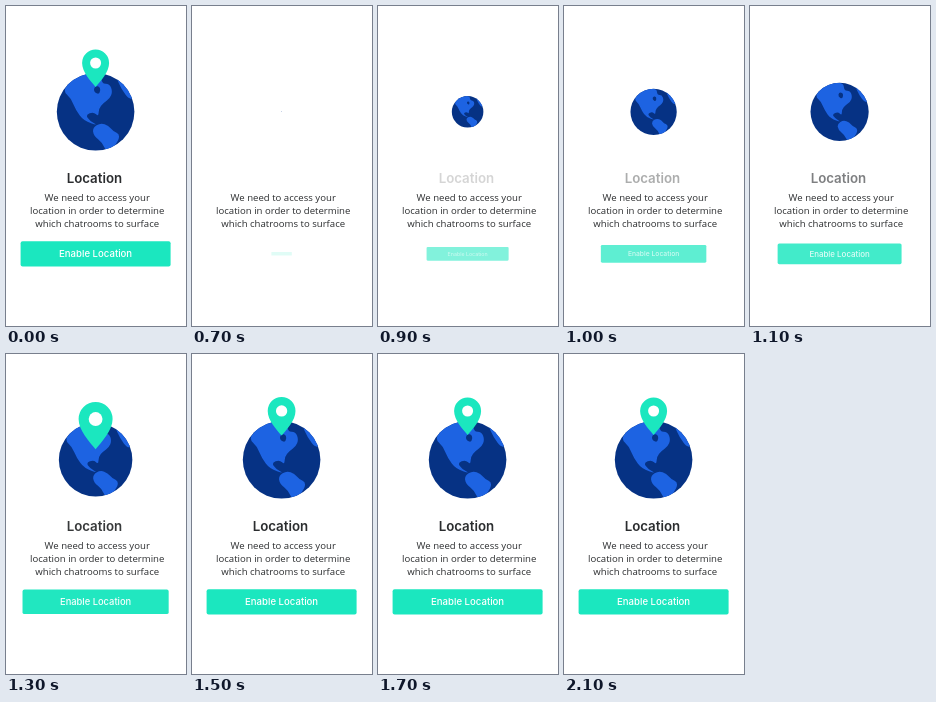
An HTML page with a canvas for the animation above (2.4 s loop, 180x320 px).

```html
<!DOCTYPE html>
<html lang="en">
<head>
<meta charset="utf-8">
<style>
html, body { margin: 0; width: 100%; height: 100%; overflow: hidden; background: #fff; }
canvas { display: block; width: 180px; height: 320px; }
</style>
</head>
<body>
<canvas id="stage"></canvas>
<script>
const W = 180, H = 320, LOOP = 2400, RESTART = 700, STEP = 100;
const canvas = document.getElementById('stage');
const ctx = canvas.getContext('2d');
const dpr = window.devicePixelRatio || 1;
canvas.width = W * dpr;
canvas.height = H * dpr;

const MINT = '#1be7bf', NAVY = '#063284', BLUE = '#1d63e2', INK = '#2b2d2f';

const clamp = (p, low = 0) => Math.min(1, Math.max(low, p));
const easeOut = p => 1 - (1 - p) ** 2;
const smooth = p => p * p * (3 - 2 * p);
const backOut = (p, s) => 1 + (s + 1) * (p - 1) ** 3 + s * (p - 1) ** 2;

// Smooth closed outline through a list of x, y pairs
function blob(color, points) {
  const n = points.length / 2;
  const at = i => [points[(i % n) * 2], points[(i % n) * 2 + 1]];
  const mid = i => {
    const [a, b] = at(i), [c, d] = at(i + 1);
    return [(a + c) / 2, (b + d) / 2];
  };
  ctx.fillStyle = color;
  ctx.beginPath();
  ctx.moveTo(...mid(0));
  for (let i = 1; i <= n; i++) ctx.quadraticCurveTo(...at(i), ...mid(i));
  ctx.fill();
}

function disc(x, y, r, color) {
  ctx.fillStyle = color;
  ctx.beginPath();
  ctx.arc(x, y, r, 0, Math.PI * 2);
  ctx.fill();
}

function scaled(x, y, s, draw) {
  if (s <= 0) return;
  ctx.save();
  ctx.translate(x, y);
  ctx.scale(s, s);
  draw();
  ctx.restore();
}

function globe() {
  disc(0, 0, 38.8, NAVY);
  ctx.clip();
  // North America, South America, Greenland, Hudson Bay
  blob(BLUE, [-28, -28, -18, -37, 5, -40, 6, -28, 14, -28, 17, -20, 14, -13, 8, -9,
              3, -3, 3, 5, -2, 0, -10, 3, -6, 9, 3, 14, -12, 9, -20, -2, -25, -14, -32, -20]);
  blob(BLUE, [-3, 16, 5, 11, 13, 14, 17, 19, 25, 23, 20, 34, 11, 41, 7, 31, -2, 24]);
  blob(BLUE, [20, -36, 30, -29, 39, -15, 34, -12, 26, -22]);
  blob(NAVY, [-1, -26, 5, -25, 4, -17, -2, -20]);
}

function pin() {
  ctx.fillStyle = MINT;
  ctx.beginPath();
  ctx.moveTo(0, 0);
  ctx.bezierCurveTo(-5, -6, -13.5, -15, -13.5, -24);
  ctx.arc(0, -24, 13.5, Math.PI, 0);
  ctx.bezierCurveTo(13.5, -15, 5, -6, 0, 0);
  ctx.fill();
  disc(0, -24, 5.5, '#fff');
}

function text(line, x, y, font, color = INK) {
  ctx.font = font;
  ctx.fillStyle = color;
  ctx.fillText(line, x, y);
}

function button() {
  ctx.fillStyle = MINT;
  ctx.beginPath();
  ctx.roundRect(-75, -12.6, 150, 25.2, 2);
  ctx.fill();
  text('Enable Location', 0, 3.5, '500 9.6px Inter, sans-serif', '#fff');
}

function render(ms) {
  // Steps since the screen restarted; before that everything is at rest
  const k = ms < RESTART ? LOOP / STEP : Math.floor((ms - RESTART) / STEP);
  const press = easeOut(clamp((k + 0.55) / 7.8));
  const spin = easeOut(clamp((k - 0.3) / 7.4, 0.004));
  const drop = clamp((k - 4.4) / 4);

  ctx.setTransform(dpr, 0, 0, dpr, 0, 0);
  ctx.globalAlpha = 1;
  ctx.fillStyle = '#fff';
  ctx.fillRect(0, 0, W, H);
  ctx.textAlign = 'center';

  scaled(89.6, 105.8, spin, globe);
  scaled(89.6, 81 + 22 * (1 - smooth(drop)), drop && backOut(drop, 3.3), pin);

  ['We need to access your', 'location in order to determine', 'which chatrooms to surface']
    .forEach((line, i) => text(line, 91.2, 195.2 + i * 13, '9.6px "Open Sans", "Noto Sans", sans-serif'));

  ctx.globalAlpha = smooth(clamp(k / 7));
  text('Location', 88.4, 176.5, '600 13.3px Inter, sans-serif');

  ctx.globalAlpha = press;
  scaled(89.6, 247.8, press, button);
}

const start = performance.now();
function tick() {
  render((performance.now() - start) % LOOP);
  requestAnimationFrame(tick);
}
tick();
</script>
</body>
</html>
```
